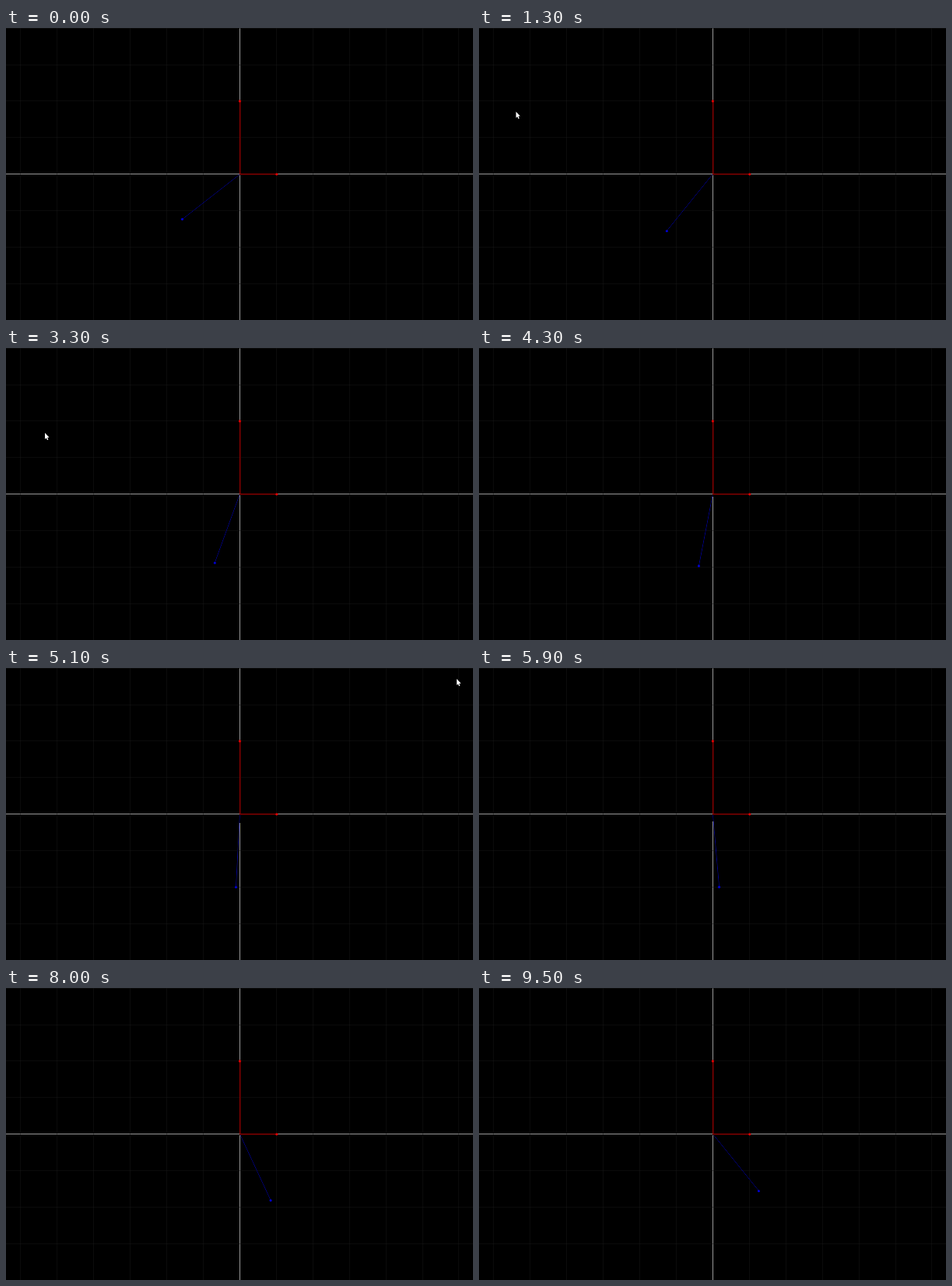
An HTML page with a canvas for the animation above (9.6 s loop, 600 px wide and 375 px high).

```html
<!DOCTYPE html>
<html lang="en">
<head>
<meta charset="utf-8">
<title>Rotating vector</title>
<style>
  html, body { margin: 0; width: 100%; height: 100%; overflow: hidden; background: #000; }
  canvas { display: block; }
</style>
</head>
<body>
<canvas id="stage" width="600" height="375"></canvas>
<script>
const ctx = document.getElementById('stage').getContext('2d');
const W = 600, H = 375, CX = 300.4, CY = 187.8, UNIT = 46.92;
const LOOP = 9600, TICK = 100;
const FIRST = 52, TURN = 91;  // degrees: starting angle and sweep per loop

const easeIn = k => k * k;
const easeOut = k => Math.sin(k * Math.PI / 2);

function rect(color, x, y, w, h) {
  ctx.fillStyle = color;
  ctx.fillRect(x, y, w, h);
}

function head(x, y, color) {
  ctx.fillStyle = color;
  ctx.beginPath();
  ctx.arc(x, y, 1.6, 0, 2 * Math.PI);
  ctx.fill();
}

function drawPlane() {
  const axis = '#989898', grid = 'rgba(26,26,26,0.45)';
  rect('#000', 0, 0, W, H);
  rect(axis, 0, Math.floor(CY), W, 1);
  rect(axis, Math.floor(CX), 0, 1, H);
  for (let i = -6; i <= 6; i++) {
    if (!i) continue;
    rect(grid, Math.floor(CX + i * UNIT), 0, 1, H);
    rect(grid, 0, Math.floor(CY + i * UNIT), W, 1);
  }
}

function drawBasis() {
  const core = '#900000', edge = '#300000', tip = '#e00000';
  const x = Math.floor(CX), y = Math.floor(CY);
  rect(core, x, y - 2 * UNIT, 1, 2 * UNIT);
  rect(edge, x + 1, y - 2 * UNIT, 1, 2 * UNIT);
  rect(edge, x, y + 1, UNIT, 1);
  rect(core, x, y, UNIT, 1);
  head(CX, CY - 2 * UNIT, tip);
  head(CX + UNIT + 0.5, CY, tip);
}

// Thin line whose faint, half-covered pixels drop out
function drawVector(deg) {
  const a = deg * Math.PI / 180, dx = -Math.sin(a), dy = Math.cos(a);
  const steep = Math.abs(dy) >= Math.abs(dx);
  const major = steep ? dy : dx, slope = steep ? dx / dy : dy / dx;
  const steps = Math.abs(major) * 2 * UNIT, dir = Math.sign(major);
  for (let i = 1; i < steps; i++) {
    const m = Math.floor((steep ? CY : CX) + dir * i);
    const pos = (steep ? CX : CY) - 0.5 + dir * i * slope;
    const n = Math.floor(pos), f = pos - n;
    [[n, 1 - f], [n + 1, f]].forEach(([p, cover]) => {
      const blue = Math.round(145 * Math.max(0, (cover - 0.3) / 0.7));
      if (blue) rect(`rgb(0,0,${blue})`, steep ? p : m, steep ? m : p, 1, 1);
    });
  }
  head(CX + dx * 2 * UNIT, CY + dy * 2 * UNIT, '#0000d0');
}

function drawPointer(x, y) {
  const arrow = [[0, 0], [0, 8], [1.8, 6.4], [3, 9.2], [4.3, 8.7], [3.1, 5.9], [5.5, 5.7]];
  ctx.fillStyle = '#fff';
  ctx.beginPath();
  arrow.forEach(([px, py]) => ctx.lineTo(x + px, y + py));
  ctx.fill();
}

// Pointer glides from (x0, y0) to (x1, y1) between two ticks, then rests until the last
function glide(tick, from, to, last, x0, y0, x1, y1, ease) {
  if (tick < from || tick > last) return;
  const k = ease(Math.min(1, (tick - from) / (to - from)));
  drawPointer(x0 + (x1 - x0) * k, y0 + (y1 - y0) * k);
}

function draw(ms) {
  const tick = Math.floor(ms / TICK);
  drawPlane();
  drawVector(FIRST - Math.floor(tick * TURN / 95 + 0.65));
  drawBasis();
  glide(tick, 9, 14, 34, 0, 77, 50, 109, easeOut);
  glide(tick, 35, 39, 39, 50, 109, 104, 20, easeIn);
  glide(tick, 49, 52, 52, 560, 1, 582, 16, easeOut);
}

const start = performance.now();
function loop() {
  draw((performance.now() - start) % LOOP);
  requestAnimationFrame(loop);
}
loop();
</script>
</body>
</html>
```
